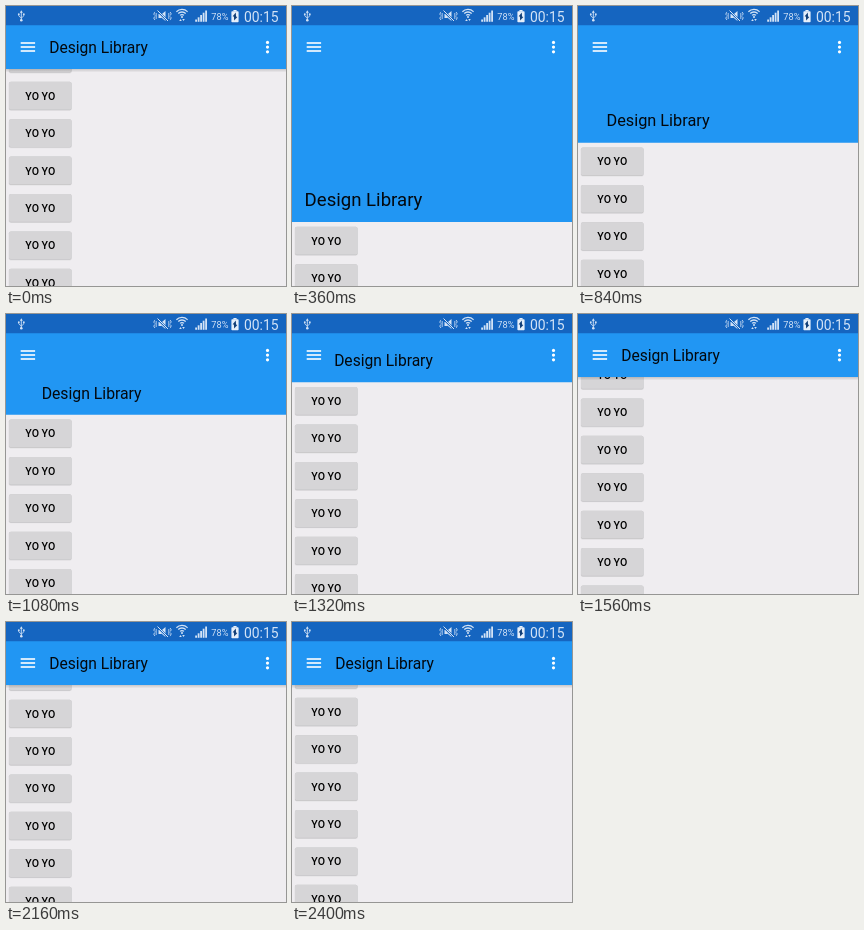
An HTML page with a canvas for the animation above (2520 ms loop, 280 px wide and 280 px high).

```html
<!DOCTYPE html>
<html lang="en">
<head>
<meta charset="utf-8">
<title>Collapsing toolbar</title>
<style>
html, body { margin: 0; width: 100%; height: 100%; overflow: hidden; }
canvas { display: block; width: 280px; height: 280px; }
</style>
</head>
<body>
<canvas id="stage"></canvas>
<script>
const SIZE = 280, LOOP = 2520, STEP = 120;
const EXPANDED = 216, COLLAPSED = 63, RANGE = EXPANDED - COLLAPSED;
const PITCH = 37.4;
const FLING = 360, DRAG = 1240, CREEP = 770;   // ms
const DRAGGED = 176.4, SCROLLED = 182.4;       // px
const FONT = 'Roboto, "Noto Sans", sans-serif';

const canvas = document.getElementById('stage');
const ctx = canvas.getContext('2d');
const ratio = window.devicePixelRatio || 1;
canvas.width = canvas.height = Math.round(SIZE * ratio);
ctx.scale(ratio, ratio);

const mix = (a, b, k) => a + (b - a) * k;
const clamp = k => Math.min(1, Math.max(0, k));

// Fling open, drag closed with a soft stop, then creep a little further.
function scrollAt(t) {
  if (t < FLING) return SCROLLED * (1 + Math.cos(Math.PI * t / FLING)) / 2;
  const u = t - FLING;
  const drag = 1 - Math.pow(1 - clamp(u / DRAG), 1.22);
  const creep = clamp((u - DRAG - 30) / CREEP);
  return DRAGGED * drag + (SCROLLED - DRAGGED) * creep;
}

function box(x, y, w, h, color, r = 0) {
  ctx.fillStyle = color;
  ctx.beginPath();
  ctx.roundRect(x, y, w, h, r);
  ctx.fill();
}

function dot(x, y, r, color) {
  box(x - r, y - r, 2 * r, 2 * r, color, r);
}

function line(x0, y0, x1, y1, width, color) {
  ctx.strokeStyle = color;
  ctx.lineWidth = width;
  ctx.beginPath();
  ctx.moveTo(x0, y0);
  ctx.lineTo(x1, y1);
  ctx.stroke();
}

function arc(x, y, r, mid, spread, width, color) {
  ctx.strokeStyle = color;
  ctx.lineWidth = width;
  ctx.beginPath();
  ctx.arc(x, y, r, mid - spread, mid + spread);
  ctx.stroke();
}

// Triangle with its base centred on (x, y) and its tip dx, dy away
function triangle(x, y, dx, dy, half, color) {
  const k = half / Math.hypot(dx, dy);
  ctx.fillStyle = color;
  ctx.beginPath();
  ctx.moveTo(x + dx, y + dy);
  ctx.lineTo(x - dy * k, y + dx * k);
  ctx.lineTo(x + dy * k, y - dx * k);
  ctx.fill();
}

function label(text, x, y, size, color, weight = 400, align = 'left') {
  ctx.font = `${weight} ${size}px ${FONT}`;
  ctx.textAlign = align;
  ctx.fillStyle = color;
  ctx.fillText(text, x, y);
}

function button(y) {
  box(2.6, y - 13.5, 63.2, 28.3, 'rgba(0,0,0,0.06)', 2);
  box(3, y - 14.2, 62.5, 28.4, '#c6c5c7', 1.8);
  box(3, y - 14.2, 62.5, 27.7, '#d6d5d7', 1.8);
  label('YO YO', 34.3, y + 3.7, 10.6, '#000', 500, 'center');
}

function usbIcon(x, c) {
  line(x, 6, x, 14, 0.9, c);
  triangle(x, 6.8, 0, -2.6, 1.5, c);
  dot(x, 14.3, 1.3, c);
  for (const side of [-1, 1]) {
    const tip = x + side * 2.5;
    line(tip, 8.3, tip, 10, 0.8, c);
    line(tip, 10, x, 12, 0.8, c);
    dot(tip, 8.2, 0.9, c);
  }
}

function muteIcon(x, c) {
  box(x - 4, 8, 3, 4, c);
  triangle(x + 3, 10, -6, 0, 5, c);
  line(x - 5, 5, x + 5.5, 15, 2, '#1565c0');
  line(x - 5, 4.5, x + 5.5, 15, 1, c);
  for (const side of [-1, 1]) {
    const mid = side < 0 ? Math.PI : 0;
    for (const y of [7.8, 12.2]) arc(x + side * 6.5, y, 2, mid, 1.1, 0.9, c);
    line(x + side * 6.3, 7, x + side * 6.3, 13, 0.8, c);
  }
}

function wifiIcon(x, c) {
  for (let r = 2.6; r < 8; r += 2.6) arc(x, 11.2, r, -Math.PI / 2, 0.8, 1.3, c);
  dot(x, 10.9, 1, c);
  triangle(x - 1.5, 15, 0, -2, 1.3, c);
  triangle(x + 1.5, 13, 0, 2, 1.3, c);
}

function batteryIcon(x, c) {
  box(x - 1.6, 4, 3.2, 1.5, c);
  box(x - 3.6, 5.2, 7.2, 11, c, 0.8);
  triangle(x - 0.6, 10.8, 1.4, -4.2, 1.8, '#123f78');
  triangle(x + 0.6, 10.4, -1.4, 4.2, 1.8, '#123f78');
}

function statusBar() {
  const c = '#d3e3f6';
  box(0, 0, SIZE, 19.3, '#1565c0');
  usbIcon(15.3, c);
  muteIcon(156.5, c);
  wifiIcon(176, c);
  for (let i = 0; i < 5; i++) {
    const h = 2.2 + i * 2.3;
    box(189.2 + i * 2.5, 15.8 - h, 1.8, h, c);
  }
  label('78%', 205.3, 14.2, 9.2, c);
  batteryIcon(229, '#e6effa');
  label('00:15', 238, 15.9, 13.9, c);
}

function shadow(y) {
  const shade = ctx.createLinearGradient(0, y, 0, y + 3.5);
  shade.addColorStop(0, 'rgba(0,0,0,0.16)');
  shade.addColorStop(1, 'rgba(0,0,0,0)');
  box(0, y, SIZE, 3.5, shade);
}

function header(bottom) {
  const open = (bottom - COLLAPSED) / RANGE;
  if (open === 0) shadow(bottom);
  box(0, 0, SIZE, bottom, '#2196f3');
  label('Design Library', mix(43.2, 12.6, open), bottom - 16 - open * 0.4,
    mix(15.6, 18.6, open * open), '#03080d');

  for (let i = -1; i <= 1; i++) {
    box(14.7, 40.2 + i * 4, 14.4, 1.6, '#fff');
    dot(261.5, 41.1 + i * 4.7, 1.6, '#fff');
  }
}

function draw(t) {
  const scroll = scrollAt(t);
  box(0, 0, SIZE, SIZE, '#efedf0');
  for (let y = EXPANDED + 19 - scroll; y < SIZE + 20; y += PITCH) button(y);
  header(Math.max(COLLAPSED, EXPANDED - scroll));
  statusBar();
}

const start = performance.now();
function tick() {
  const t = (performance.now() - start) % LOOP;
  draw(Math.floor(t / STEP) * STEP);
  requestAnimationFrame(tick);
}
tick();
</script>
</body>
</html>
```
